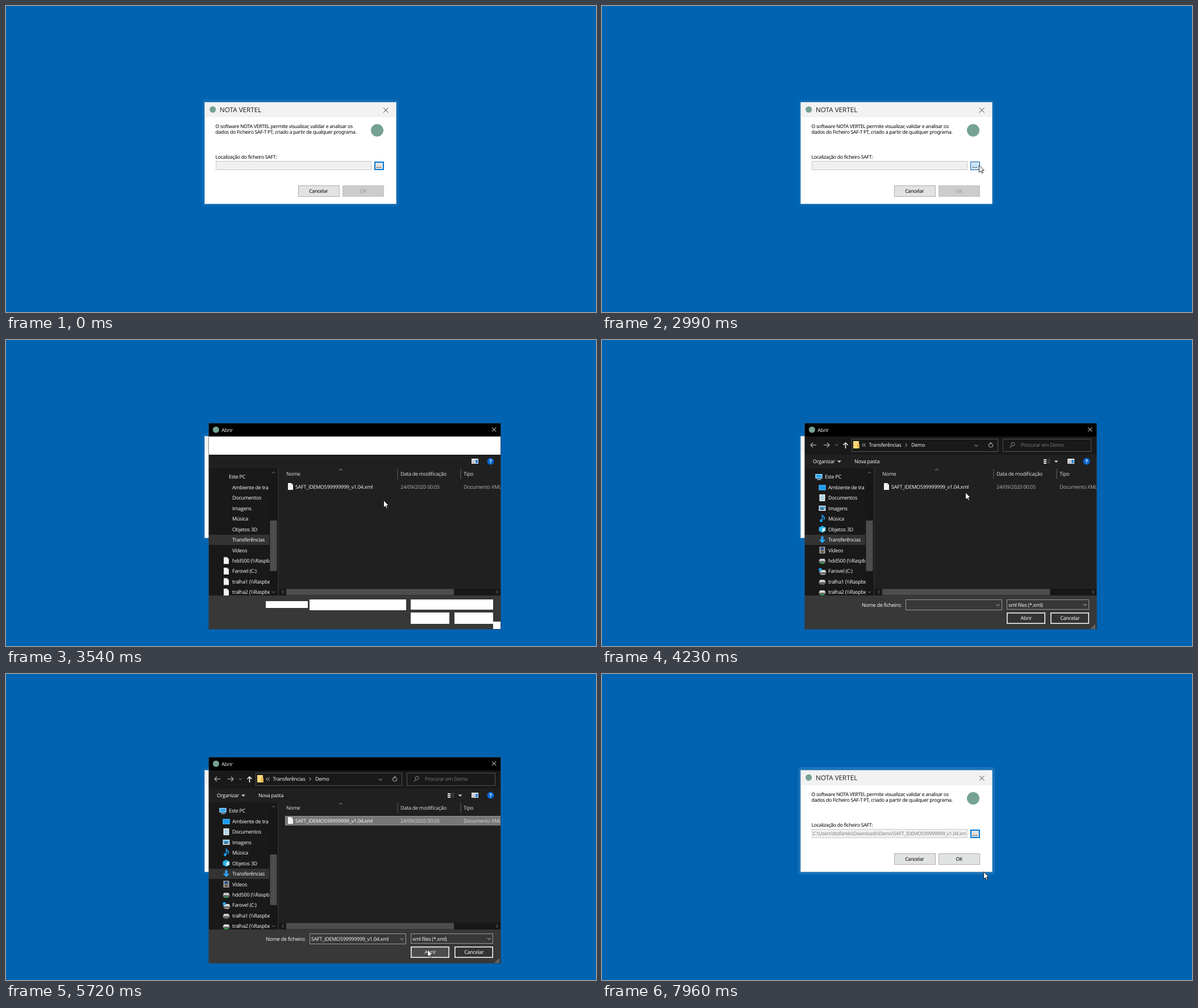
An HTML page with a canvas that plays this animation: 1038x539 px, repeating every 8 s.

```html
<!DOCTYPE html>
<html lang="pt">
<head>
<meta charset="utf-8">
<style>
html, body { margin: 0; width: 100%; height: 100%; overflow: hidden; background: #0063b1; }
canvas { display: block; }
</style>
</head>
<body>
<canvas id="stage" width="1038" height="539"></canvas>
<script>
const ctx = document.getElementById('stage').getContext('2d');
const LOOP = 8000;
const APP = 'NOTA VERTEL';
const FILE = 'SAFT_IDEMO599999999_v1.04.xml';
const FORM = ['8.7px "Noto Sans", sans-serif', '-0.3px'];
const SHELL = ['500 9px "Open Sans", sans-serif', '-0.27px'];
const TITLE = ['11.7px "Open Sans", sans-serif', '0px'];
const LOGO = '#75a294';

// Pointer legs: start ms, end ms, steps, x, y
const legs = [
  [130, 230, 2, 976, 371],
  [710, 800, 2, 934, 364],
  [1110, 1880, 11, 659, 280],
  [2580, 2580, 1, 662, 280],
  [2910, 2990, 2, 663, 280],
  [3290, 3290, 1, 664, 282],
  [4010, 4310, 5, 626, 261],
  [5010, 5720, 10, 741, 485],
  [6960, 7350, 6, 720, 407],
  [7580, 7960, 6, 671, 348]
];

function pointer(t) {
  let x = 1080, y = 649;
  for (const [a, b, n, tx, ty] of legs) {
    if (t < a) break;
    const gap = n > 1 ? (b - a) / (n - 1) : 1;
    const p = Math.min(n, Math.floor((t - a) / gap + 1e-6) + 1) / n;
    const e = p * p * (3 - 2 * p);
    x += (tx - x) * e;
    y += (ty - y) * e;
  }
  return [Math.round(x), Math.round(y)];
}

const inside = ([x, y], l, t, r, b) => x >= l && x < r && y >= t && y < b;

function box(l, t, r, b, fill, edge, w = 1) {
  if (fill) {
    ctx.fillStyle = fill;
    ctx.fillRect(l, t, r - l, b - t);
  }
  if (edge) {
    ctx.strokeStyle = edge;
    ctx.lineWidth = w;
    ctx.strokeRect(l + w / 2, t + w / 2, r - l - w, b - t - w);
  }
}

function disc(x, y, r, fill) {
  ctx.fillStyle = fill;
  ctx.beginPath();
  ctx.arc(x, y, r, 0, 7);
  ctx.fill();
}

function line(color, w, ...pts) {
  ctx.strokeStyle = color;
  ctx.lineWidth = w;
  ctx.beginPath();
  for (let i = 0; i < pts.length; i += 2) ctx.lineTo(pts[i], pts[i + 1]);
  ctx.stroke();
}

function shape(fill, ...pts) {
  ctx.fillStyle = fill;
  ctx.beginPath();
  for (let i = 0; i < pts.length; i += 2) ctx.lineTo(pts[i], pts[i + 1]);
  ctx.fill();
}

function text(str, x, y, color = '#fff', style = SHELL, align = 'left') {
  ctx.font = style[0];
  ctx.letterSpacing = style[1];
  ctx.textAlign = align;
  ctx.fillStyle = color;
  ctx.fillText(str, x, y);
}

function clipped(l, t, r, b, draw) {
  ctx.save();
  ctx.beginPath();
  ctx.rect(l, t, r - l, b - t);
  ctx.clip();
  draw();
  ctx.restore();
}

function cross(x, y, r, color) {
  line(color, 1, x - r, y - r, x + r, y + r);
  line(color, 1, x - r, y + r, x + r, y - r);
}

const vee = (x, y, s, color = '#c8c8c8', d = 1) =>
  line(color, 1, x - s, y - d * s / 2, x, y + d * s / 2, x + s, y - d * s / 2);
const side = (x, y, d, color = '#8a8a8a') =>
  line(color, 1, x - d * 1.5, y - 3, x + d * 1.5, y, x - d * 1.5, y + 3);
const drop = (x, y) => shape('#d8d8d8', x - 3.5, y - 1.5, x + 3.5, y - 1.5, x, y + 2);

function arrow(x, y, d, color) {
  line(color, 1.4, x - 5 * d, y, x + 5 * d, y);
  line(color, 1.4, x + d, y - 4, x + 5 * d, y, x + d, y + 4);
}

function page(x, y) {
  shape('#f4f4f4', x, y, x + 6, y, x + 9, y + 3, x + 9, y + 12, x, y + 12);
  shape('#b8b8b8', x + 6, y, x + 9, y + 3, x + 6, y + 3);
}

function form(t, cur) {
  const glow = t < 2190 ? 0.05 : t < 6710 ? 0.03 : 0.1;
  ctx.fillStyle = `rgba(255,255,255,${glow})`;
  ctx.beginPath();
  ctx.roundRect(345, 164, 346, 189, 5);
  ctx.fill();
  box(349, 169, 687, 349, '#fff');
  box(349, 169, 687, 196, '#f2f2f2');
  box(349, 169, 687, 349, null, '#a9c0d4');
  disc(363.7, 182.3, 5.6, LOGO);
  text(APP, 376, 187, '#1b1b1b', TITLE);
  cross(668.3, 183.5, 4.3, '#3a3a3a');
  disc(653, 219, 11, LOGO);
  text(`O software ${APP} permite visualizar, validar e analisar os`, 368.5, 215.3, '#000', FORM);
  text('dados do Ficheiro SAF-T PT, criado a partir de qualquer programa.', 368.5, 225.3, '#000', FORM);
  text('Localização do ficheiro SAFT:', 368.5, 269.3, '#000', FORM);

  const ready = t >= 6890;
  box(369, 273, 643, 289, '#f0f0f0', '#c9c9c9');
  if (ready) clipped(370, 274, 641, 288, () =>
    text('C:\\Users\\titofarelo\\Downloads\\Demo\\' + FILE, 371, 284, '#838383', [FORM[0], '-0.36px']));

  if (inside(cur, 648, 274, 665, 288)) box(648, 274, 665, 289, '#cce4f7', '#1460a5');
  else box(648, 274, 665, 289, '#e1e1e1', '#0078d7', 2);
  for (let i = 0; i < 3; i++) box(652 + i * 3.3, 283.6, 653.4 + i * 3.3, 285, '#111');

  box(514, 316, 587, 336, '#e1e2e2', '#adadad');
  text('Cancelar', 549.7, 329.2, '#000', FORM, 'center');
  box(592, 316, 665, 336, ready ? '#e1e2e2' : '#cccccc', ready ? '#adadad' : '#bfbfbf');
  text('OK', 628.3, 329.2, ready ? '#000' : '#9a9a9a', FORM, 'center');
}

const drive = light => (x, y) => {
  shape('#d9d9d9', x - 4, y - 3, x + 4, y - 3, x + 6, y + 1, x - 6, y + 1);
  box(x - 6, y + 1, x + 6, y + 3.5, '#777');
  box(x - 4, y + 4, x + 4, y + 5.5, light);
};

const tree = [
  ['Este PC', (x, y) => {
    box(x - 12, y - 5, x, y + 3, '#35a7ec', '#b9e2fb');
    box(x - 9, y + 4, x - 2, y + 5.5, '#9ccbe8');
  }],
  ['Ambiente de tra', (x, y) => box(x - 6, y - 4, x + 6, y + 5, '#1d9bf0', '#4cb8fa')],
  ['Documentos', (x, y) => {
    box(x - 5, y - 6, x + 5, y + 6, '#e8eef2');
    for (let i = -3; i < 5; i += 3) line('#2f9fd0', 1, x - 3, y + i, x + 3, y + i);
  }],
  ['Imagens', (x, y) => {
    box(x - 6, y - 4.5, x + 6, y + 4.5, '#eef3f6');
    box(x - 5, y - 3, x + 5, y + 1, '#3f9fdd');
    shape('#3a5f78', x - 5, y + 3, x - 1, y - 1, x + 5, y + 3);
  }],
  ['Música', (x, y) => {
    disc(x - 2, y + 3.5, 2.5, '#1d9bf0');
    line('#1d9bf0', 1.7, x, y + 3, x, y - 6, x + 4, y - 2, x + 3, y + 2);
  }],
  ['Objetos 3D', (x, y) => {
    shape('#2cb4e8', x - 6, y - 3, x, y - 6, x + 6, y - 3, x + 6, y + 3, x, y + 6, x - 6, y + 3);
    shape('#d5f2fc', x, y - 1, x + 5, y - 3, x + 5, y + 3, x, y + 5);
  }],
  ['Transferências', (x, y) => {
    shape('#2ea4f5', x - 2, y - 6, x + 2, y - 6, x + 2, y, x + 6, y, x, y + 6, x - 6, y, x - 2, y);
  }],
  ['Vídeos', (x, y) => {
    box(x - 5, y - 6, x + 5, y + 6, '#a8a8a8');
    box(x - 3, y - 5, x + 3, y, '#304f80');
    box(x - 3, y + 1, x + 3, y + 5, '#6a5a44');
  }],
  ['hdd500 (\\\\Raspberry)', drive('#38c05b')],
  ['Farovel (C:)', (x, y) => {
    drive('#c8c8c8')(x + 1, y + 1);
    box(x - 6, y - 5, x - 1, y, '#22a7f0');
  }],
  ['tralha1 (\\\\Raspberry)', drive('#777')],
  ['tralha2 (\\\\Raspberry)', drive('#38c05b')]
];

function navBar() {
  box(357, 170, 870, 202, '#191919');
  arrow(372, 185, -1, '#a8a8a8');
  arrow(395, 185, 1, '#a8a8a8');
  vee(412.5, 185, 2.5, '#9a9a9a');
  line('#fff', 1.5, 428.5, 191, 428.5, 181);
  line('#fff', 1.5, 424.5, 185, 428.5, 181, 432.5, 185);
  box(439, 174, 697, 197, '#191919', '#535353');
  box(442, 178, 452, 191, '#ffd978');
  box(449, 183, 453, 191, '#e8b44c');
  side(459, 185, -0.9, '#ccc');
  side(462.5, 185, -0.9, '#ccc');
  text('Transferências', 469.5, 188.4);
  side(535, 185, 0.9, '#ccc');
  text('Demo', 544, 188.4);
  vee(658.5, 186, 3);
  ctx.strokeStyle = '#a8a8a8';
  ctx.lineWidth = 1.1;
  ctx.beginPath();
  ctx.arc(684, 185.5, 3.5, -0.6, 4.6);
  ctx.stroke();
  shape('#a8a8a8', 683, 180, 687, 182, 683, 184);
  box(705, 174, 861, 197, '#191919', '#535353');
  ctx.strokeStyle = '#8c8c8c';
  ctx.beginPath();
  ctx.arc(723, 183.5, 3, 0, 7);
  ctx.stroke();
  line('#8c8c8c', 1.1, 721, 186, 717.5, 190);
  text('Procurar em Demo', 737, 188.4, '#7c7c7c');
}

function commands() {
  text('Organizar', 371, 216.8);
  drop(417.5, 214);
  text('Nova pasta', 444, 216.8);
  for (let y = 210; y < 219; y += 3) {
    box(777, y, 782, y + 2, '#e4e4e4');
    box(783.5, y, 785.5, y + 1, '#777');
    box(786.5, y, 788.5, y + 1, '#777');
  }
  drop(799, 214);
}

function footer(ready, picked, cur) {
  if (!ready) {
    box(457, 460, 531, 472, '#fff');
    box(534, 457, 704, 476, '#fff');
    box(712, 457, 857, 475, '#fff');
    box(712, 480, 780, 500, '#fff');
    box(789, 480, 857, 500, '#fff');
    box(857, 496, 870, 509, '#fff');
    return;
  }
  text('Nome de ficheiro:', 457, 470.2);
  box(534, 457, 704, 476, '#383838', '#9b9b9b');
  if (picked) text(FILE, 537, 470.2);
  vee(696.5, 467, 3);
  box(712, 457, 857, 475, '#383838', '#9b9b9b');
  text('xml files (*.xml)', 715, 470.2);
  vee(850, 466.5, 3);
  box(712, 480, 780, 500, inside(cur, 712, 480, 780, 500) ? '#4c4c4c' : '#333', '#f4f4f4', 1.6);
  text('Abrir', 746.3, 493, '#fff', SHELL, 'center');
  box(789, 480, 857, 500, '#333', '#f4f4f4', 1.6);
  text('Cancelar', 823.3, 493, '#fff', SHELL, 'center');
  for (let i = 0; i < 3; i++)
    for (let j = 0; j <= i; j++)
      box(866 - j * 2.5, 502 + i * 2.5, 867.4 - j * 2.5, 503.4 + i * 2.5, '#c8c8c8');
}

function picker(t, cur) {
  const ready = t >= 3630, picked = t >= 4390;
  box(356.4, 146.4, 870.6, 509.6, '#3a3a3a');
  box(357, 147, 870, 170, '#000');
  disc(369.4, 158, 5.6, LOGO);
  text('Abrir', 379.3, 161.5);
  cross(858.6, 157.7, 3.6, '#fff');
  box(357, 170, 870, 509, '#fff');
  if (t < 3450) return;

  box(357, 202, 870, 450, '#202020');
  box(357, 450, 870, 509, '#383838');
  if (ready) {
    navBar();
    commands();
  }
  box(819, 209, 831, 218, '#e4e4e4');
  box(826, 211, 830, 217, '#2b86d8');
  for (let y = 212; y < 217; y += 2) box(820, y, 825, y + 1, '#aaa');
  disc(852.5, 213.8, 6, '#0a66d0');
  text('?', 852.6, 217.3, '#fff', ['bold 9px "Open Sans", sans-serif', '0px'], 'center');

  box(357, 226, 478, 450, '#191919');
  box(478, 226, 480, 450, '#2a2a2a');
  clipped(357, 226, 464, 450, () => {
    box(357, 343, 463, 361, '#333');
    tree.forEach(([name, icon], i) => {
      const y = 241 + i * 18.45;
      if (ready) icon(387.5, y);
      else if (i > 7) page(383, y - 6);
      text(name, i ? 398 : 392, y + 3.4);
    });
  });
  box(464, 226, 477, 450, '#171717');
  box(464.5, 318, 476.5, 407, '#4d4d4d');
  vee(470.5, 233.5, 2.6, '#8a8a8a', -1);
  vee(470.5, 444, 2.6, '#8a8a8a');

  text('Nome', 493, 239.4, '#e4e4e4');
  vee(589, 228.5, 3, '#a0a0a0', -1);
  text('Data de modificação', 694, 239.4, '#e4e4e4');
  text('Tipo', 805, 239.4, '#e4e4e4');
  box(688.5, 227, 689.5, 245, '#636363');
  box(799.5, 227, 800.5, 245, '#636363');

  clipped(480, 246, 870, 450, () => {
    if (picked) box(491, 250, 875, 266.5, '#777', '#939393');
    else if (inside(cur, 491, 250, 870, 267)) box(491, 250, 875, 266.5, '#4d4d4d');
    page(496, 252);
    const dim = picked ? '#d6d6d6' : '#b0b0b0';
    text(FILE, 509, 261.5);
    text('24/09/2020 00:05', 694, 261.5, dim);
    text('Documento XML', 805, 261.5, dim);
  });
  box(480, 438, 870, 450, '#171717');
  box(493, 438.5, 788, 449.5, inside(cur, 493, 438, 788, 450) ? '#7a7a7a' : '#4d4d4d');
  side(487, 444, -1);
  side(864, 444, 1);
  footer(ready, picked, cur);
}

function drawPointer([x, y]) {
  ctx.save();
  ctx.translate(x + 0.5, y + 0.5);
  ctx.beginPath();
  for (const [px, py] of [[0, 0], [0, 12.5], [2.9, 9.9], [4.9, 14], [6.9, 13.1], [5, 9.2], [8.7, 9]]) ctx.lineTo(px, py);
  ctx.closePath();
  ctx.fillStyle = '#fff';
  ctx.fill();
  ctx.strokeStyle = '#111';
  ctx.lineWidth = 0.9;
  ctx.stroke();
  ctx.restore();
}

function draw(now) {
  const t = now % LOOP;
  const cur = pointer(t);
  ctx.textRendering = 'geometricPrecision';
  box(0, 0, 1038, 539, '#0063b1');
  form(t, cur);
  if (t >= 3290 && t < 6580) picker(t, cur);
  drawPointer(cur);
}

let start;
function tick(now) {
  start ??= now;
  draw(now - start);
  requestAnimationFrame(tick);
}
draw(0);
requestAnimationFrame(tick);
</script>
</body>
</html>
```
